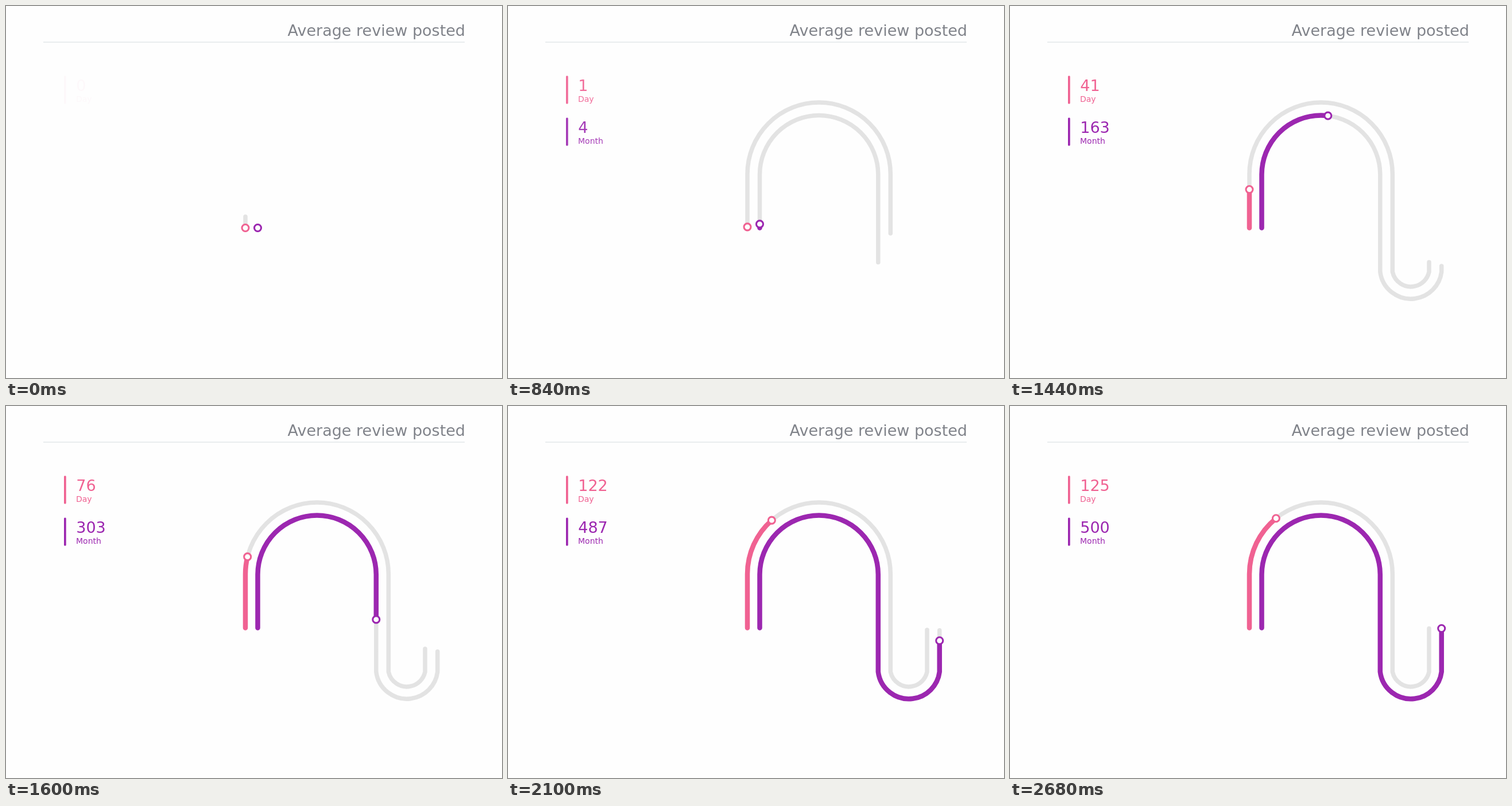
Animation of 864x648 px, one loop 6.82 s. Source, as an HTML page with a canvas:

```html
<!DOCTYPE html>
<html lang="en">
<head>
<meta charset="utf-8">
<title>Average review posted</title>
<style>
  html, body { margin: 0; width: 100%; height: 100%; overflow: hidden; background: #fefefe; }
  canvas { display: block; width: 864px; height: 648px; }
</style>
</head>
<body>
<canvas id="stage" width="864" height="648"></canvas>
<script>
const ctx = document.getElementById('stage').getContext('2d');
const LOOP = 6820, STEP = 20, DURATION = 2500;
const MAX = 500;
const FONT = '"DejaVu Sans", sans-serif';

const clamp = x => Math.min(1, Math.max(0, x));
const outCubic = x => 1 - (1 - clamp(x)) ** 3;
const inOutQuint = v => {
  const x = clamp(v);
  return x < 0.5 ? 16 * x ** 5 : 1 - 16 * (1 - x) ** 5;
};

const line = (x, y0, y1) => ({
  length: Math.abs(y1 - y0),
  at: f => [x, y0 + (y1 - y0) * f],
  trace: () => { ctx.lineTo(x, y0); ctx.lineTo(x, y1); }
});

const arc = (cx, cy, r, a0, a1) => ({
  length: r * Math.abs(a1 - a0),
  at: f => {
    const a = a0 + (a1 - a0) * f;
    return [cx + r * Math.cos(a), cy + r * Math.sin(a)];
  },
  trace: () => ctx.arc(cx, cy, r, a0, a1, a1 < a0)
});

// A tall arch that drops into a shallow cup; the cup meets the stems at an angle.
function makeRoute(left, right, end, archY) {
  const startY = 386.5, endY = 387.5, cupY = 456.3, joinY = 463;
  const half = (end - right) / 2;
  const cupR = Math.hypot(half, joinY - cupY);
  const tilt = Math.asin((joinY - cupY) / cupR);
  const parts = [
    line(left, startY, archY),
    arc((left + right) / 2, archY, (right - left) / 2, Math.PI, 2 * Math.PI),
    line(right, archY, joinY),
    arc(right + half, cupY, cupR, Math.PI - tilt, tilt),
    line(end, joinY, endY)
  ];
  return { parts, length: parts.reduce((sum, p) => sum + p.length, 0) };
}

const series = [
  { label: 'Day', value: 125, color: '#f06292', top: 121.5, delay: -20,
    route: makeRoute(417, 666.3, 730, 292.75) },
  { label: 'Month', value: 500, color: '#9c27b0', top: 194.5, delay: 20,
    route: makeRoute(438.5, 644.8, 751.7, 293.6) }
];

function strokeRoute(route, fraction, color, width) {
  if (fraction <= 0) return;
  ctx.beginPath();
  route.parts.forEach(p => p.trace());
  ctx.setLineDash(fraction < 1 ? [route.length * fraction, 2000] : []);
  ctx.lineCap = 'round';
  ctx.strokeStyle = color;
  ctx.lineWidth = width;
  ctx.stroke();
  ctx.setLineDash([]);
}

function pointOn(route, fraction) {
  let rest = route.length * fraction;
  for (const p of route.parts) {
    if (rest <= p.length) return p.at(rest / p.length);
    rest -= p.length;
  }
  return route.parts[route.parts.length - 1].at(1);
}

function text(str, x, y, size) {
  ctx.font = `${size}px ${FONT}`;
  ctx.fillText(str, x, y);
}

function drawHeader() {
  ctx.fillStyle = '#80838a';
  text('Average review posted', 490.6, 52.2, 27);
  ctx.fillStyle = '#e0e5e8';
  ctx.fillRect(65, 62.3, 734, 1.35);
}

function drawLegend(s, t, amount) {
  ctx.globalAlpha = outCubic((t - s.delay) / 1500);
  ctx.fillStyle = s.color;
  ctx.beginPath();
  ctx.roundRect(101, s.top, 3.7, 49, 1.6);
  ctx.fill();
  text(String(Math.round(s.value * amount)), 122.2, s.top + 26.6, 27);
  text(s.label, 122, s.top + 45.6, 14);
  ctx.globalAlpha = 1;
}

function drawDot(s, amount) {
  const [x, y] = pointOn(s.route, s.value / MAX * amount);
  ctx.beginPath();
  ctx.arc(x, y, 6, 0, 2 * Math.PI);
  ctx.fillStyle = '#fefefe';
  ctx.fill();
  ctx.strokeStyle = s.color;
  ctx.lineWidth = 3.1;
  ctx.stroke();
}

function draw(t) {
  const amount = inOutQuint((t - 292) / DURATION);
  ctx.fillStyle = '#fefefe';
  ctx.fillRect(0, 0, 864, 648);
  drawHeader();
  for (const s of series) {
    drawLegend(s, t, amount);
    strokeRoute(s.route, outCubic((t - s.delay) / DURATION), '#e3e3e3', 7.5);
  }
  for (const s of series) {
    strokeRoute(s.route, s.value / MAX * amount, s.color, 8.5);
    drawDot(s, amount);
  }
}

const start = performance.now();
function tick() {
  const t = (performance.now() - start) % LOOP;
  draw(Math.floor(t / STEP) * STEP);
  requestAnimationFrame(tick);
}
tick();
</script>
</body>
</html>
```
